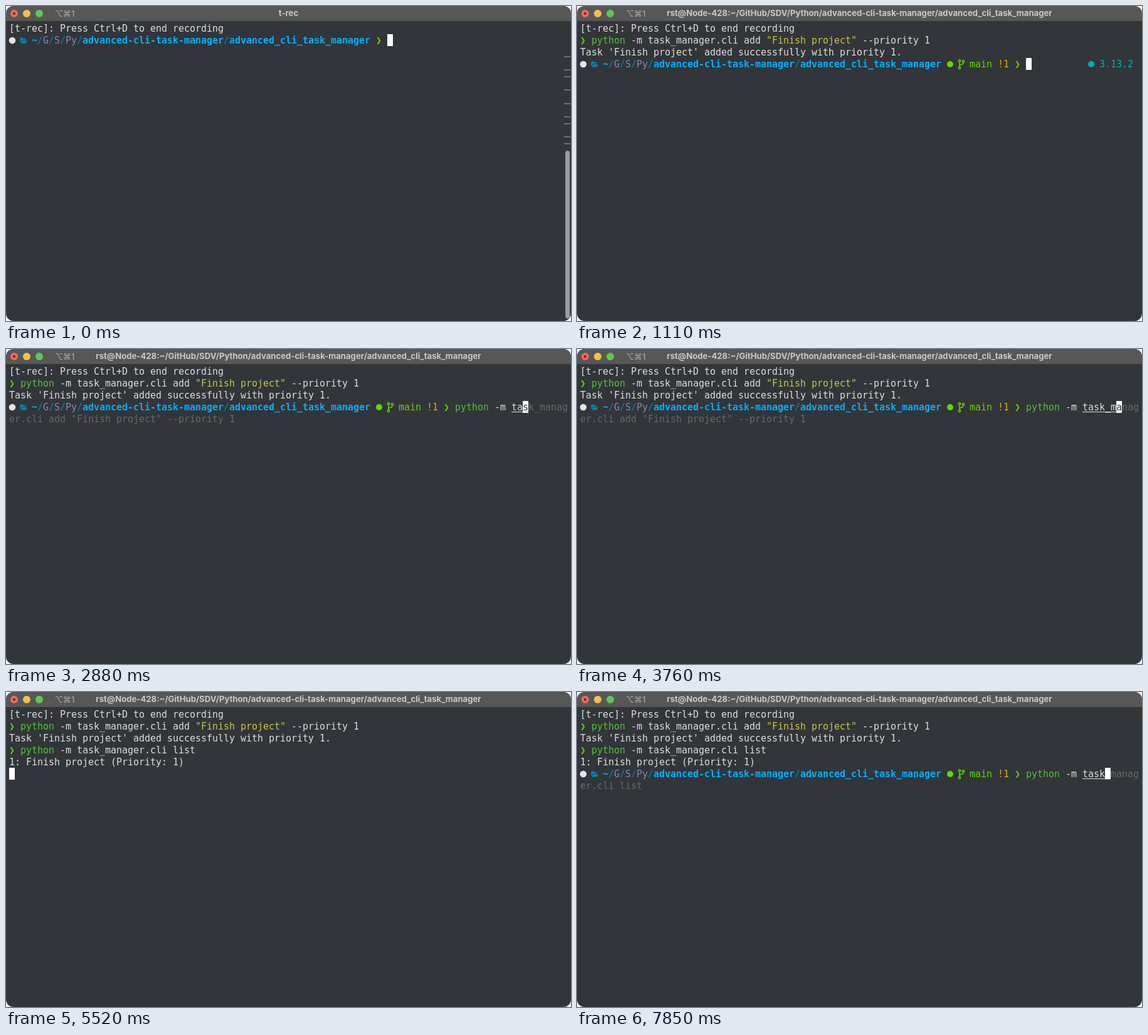
Write an HTML page with a canvas that moves like this. It is 901 px wide and 503 px high and loops after 8 s.

```html
<!DOCTYPE html>
<html lang="en">
<head>
<meta charset="utf-8">
<title>Terminal</title>
<style>
  html, body { margin: 0; height: 100%; overflow: hidden; background: #fff; }
  canvas { display: block; }
</style>
</head>
<body>
<canvas id="stage" width="901" height="503"></canvas>
<script>
const g = document.getElementById('stage').getContext('2d');
const LOOP = 8000, COLS = 99, CELL = 9, LINE = 19, LEFT = 5, TOP = 26;
const BG = '#323539', FG = '#dedede', GREEN = '#5fd700', CMD = '#51c238', RED = '#c9463c',
      STRING = '#c7c748', DIM = '#66686a', PATH = '#0087af', ANCHOR = '#00afff',
      SHORT = '#8787af', AMBER = '#d7af00', TEAL = '#00afaf';
const MONO = '15px "DejaVu Sans Mono", monospace';
const SANS = 'Inter, sans-serif';

const ADD = 'python -m task_manager.cli add "Finish project" --priority 1';
const LIST = 'python -m task_manager.cli list';
const OUTPUT = ["Task 'Finish project' added successfully with priority 1.",
                '1: Finish project (Priority: 1)'];

// [start ms, finished lines, typed characters (-1 while a command runs)]
const STEPS = [
  [0, 0, 0], [250, 0, 18], [520, 0, 37], [810, 1, -1], [1110, 2, 0], [1410, 2, 1],
  [1700, 2, 3], [2000, 2, 6], [2300, 2, 8], [2590, 2, 10], [2880, 2, 12], [3180, 2, 14],
  [3470, 2, 16], [3770, 2, 18], [4060, 2, 21], [4350, 2, 24], [4650, 2, 26], [4940, 2, 29],
  [5230, 3, -1], [5520, 4, -1], [5820, 4, 0], [6110, 4, 1], [6400, 4, 3], [6690, 4, 6],
  [6970, 4, 9], [7260, 4, 10], [7560, 4, 12], [7850, 4, 14]
];

const cellX = pos => LEFT + pos % COLS * CELL;
const cellY = pos => TOP + Math.floor(pos / COLS) * LINE;

function rect(x, y, w, h, color, r = 0) {
  g.fillStyle = color;
  g.beginPath();
  g.roundRect(x, y, w, h, r);
  g.fill();
}

function dot(x, y, r, color) {
  g.fillStyle = color;
  g.beginPath();
  g.arc(x, y, r, 0, 7);
  g.fill();
}

// Writes on the wrapping character grid and returns the next position
function put(str, pos, color = FG, bold = false) {
  g.font = (bold ? 'bold ' : '') + MONO;
  g.textAlign = 'left';
  g.textBaseline = 'alphabetic';
  g.fillStyle = color;
  for (const ch of str) {
    g.fillText(ch, cellX(pos), cellY(pos) + 15);
    pos++;
  }
  return pos;
}

// The command word and quoted strings are coloured
function putCommand(str, pos) {
  for (const [part] of str.matchAll(/"[^"]*"?|[^\s"]+|\s+/g)) {
    const first = str.startsWith(part);
    const color = part[0] === '"' ? STRING : !first ? FG : part === 'python' ? CMD : RED;
    pos = put(part, pos, color);
  }
}

function cursor(pos) {
  rect(cellX(pos), cellY(pos), CELL, LINE, '#fff');
}

function folder(x, y) {
  g.fillStyle = PATH;
  g.fill(new Path2D(`M${x} ${y + 8}V${y + 1}l1-1h3l1.5 1.5h3.5v2h-6z`));
  g.fill(new Path2D(`M${x + 0.8} ${y + 9}l2.4-4.6h8.3l-2.4 4.6z`));
}

function branch(x, y) {
  g.strokeStyle = GREEN;
  g.lineWidth = 1.5;
  g.beginPath();
  for (const [cx, cy] of [[3, 4.5], [9, 5.5], [3, 16]]) {
    g.moveTo(x + cx + 1.7, y + cy);
    g.arc(x + cx, y + cy, 1.7, 0, 7);
  }
  g.moveTo(x + 3, y + 6.2);
  g.lineTo(x + 3, y + 14.3);
  g.moveTo(x + 9, y + 7.2);
  g.quadraticCurveTo(x + 9, y + 10, x + 6, y + 10.6);
  g.quadraticCurveTo(x + 3, y + 11, x + 3, y + 13);
  g.stroke();
}

function prompt(row, git, changed) {
  const start = row * COLS, y = cellY(start);
  dot(10, y + 10, 5.3, '#e4e4e4');
  folder(22.5, y + 5.5);
  let pos = put('~', start + 4, ANCHOR, true);
  for (const name of ['G', 'S', 'Py']) pos = put(name, put('/', pos, PATH), SHORT);
  pos = put('advanced-cli-task-manager', put('/', pos, PATH), ANCHOR, true);
  pos = put('advanced_cli_task_manager', put('/', pos, PATH), ANCHOR, true) + 1;
  if (git) {
    dot(cellX(pos) + 5, y + 10, 5, GREEN);
    branch(cellX(pos + 2) - 1, y);
    pos = put('main', pos + 4, GREEN) + 1;
  }
  if (changed) pos = put('!1', pos, AMBER) + 1;
  return put('❯', pos, GREEN) + 1;
}

function titleBar(title) {
  rect(0, 0, 901, 24, '#575757');
  dot(13, 12, 6, '#ed6a5e');
  dot(13, 12, 2, '#8c1a10');
  dot(33, 12, 6, '#f4bf4f');
  dot(53, 12, 6, '#61c554');
  g.textBaseline = 'middle';
  g.textAlign = 'center';
  g.fillStyle = '#a4a4a4';
  g.font = '500 13px ' + SANS;
  g.fillText('⌥⌘1', 93.5, 13);
  g.fillStyle = '#c9c9c9';
  g.font = '700 13.14px ' + SANS;
  g.fillText(title, 450.5, 12.5);
}

function scrollBar() {
  for (const y of [81, 102, 113, 134, 156, 177, 188, 209, 220])
    rect(890, y - 1, 10, 2, '#6f7274');
  rect(892, 231, 7, 268, '#9b9d9e', 3.5);
}

function version(row) {
  const pos = row * COLS + 90;
  dot(cellX(pos) + 5, cellY(pos) + 10, 5, TEAL);
  put('3.13.2', pos + 2, TEAL);
}

function inputLine(lines, typed) {
  const fresh = lines === 0;
  const cmd = lines === 2 ? LIST : ADD;
  const last = lines === 2 ? ADD : LIST;
  const pos = prompt(lines + 1, !fresh || typed > 0, !fresh);
  const text = cmd.slice(0, typed), end = pos + typed;
  cursor(end);
  if (fresh) {
    put(text, pos);
    return;
  }
  if (!typed) {
    version(lines + 1);
    return;
  }
  putCommand(text, pos);
  if (last.startsWith(text)) {
    put(last[typed], end, BG);
    put(last.slice(typed + 1), end + 1, DIM);
  }
  // An argument that matches a folder name is underlined
  if (typed > 10 && typed <= 22)
    rect(cellX(pos + 10), cellY(pos) + 17, (typed - 10) * CELL, 1, FG);
}

function draw(time) {
  const [start, lines, typed] = STEPS.findLast(step => step[0] <= time);
  const boot = start === 0;
  g.clearRect(0, 0, 901, 503);
  g.save();
  g.beginPath();
  g.roundRect(0, 0, 901, 503, 12);
  g.clip();
  rect(0, 0, 901, 503, BG);
  titleBar(boot ? 't-rec'
    : 'rst@Node-428:~/GitHub/SDV/Python/advanced-cli-task-manager/advanced_cli_task_manager');
  put('[t-rec]: Press Ctrl+D to end recording', 0);
  for (let i = 0; i < lines; i++) {
    const pos = (i + 1) * COLS;
    if (i % 2) put(OUTPUT[(i - 1) / 2], pos);
    else {
      put('❯', pos, GREEN);
      putCommand(i ? LIST : ADD, pos + 2);
    }
  }
  if (typed < 0) cursor((lines + 1) * COLS);
  else inputLine(lines, typed);
  if (boot) scrollBar();
  g.restore();
}

const begin = performance.now();
function tick() {
  draw((performance.now() - begin) % LOOP);
  requestAnimationFrame(tick);
}
tick();
</script>
</body>
</html>
```
